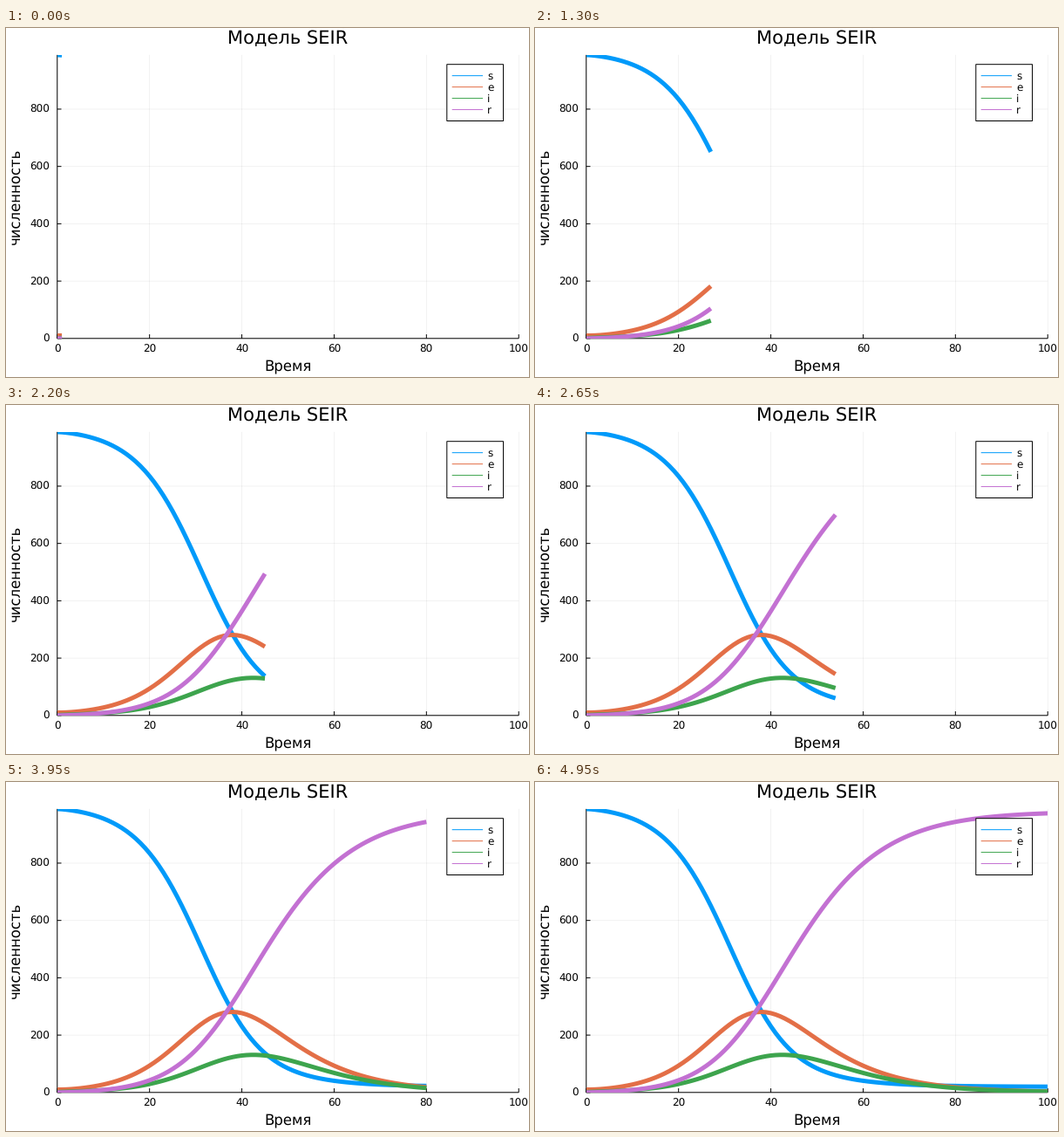
These frames come from a looping animation (600 by 400 pixels, 5 s). A matplotlib script:

```python
import numpy as np
import matplotlib.pyplot as plt
from matplotlib.animation import FuncAnimation
from matplotlib.patches import Rectangle

plt.rcParams["font.family"] = "DejaVu Sans"
plt.rcParams["text.hinting"] = "none"
plt.rcParams["path.simplify"] = False

WIDTH, HEIGHT, DPI = 600, 400, 100
PT = 72 / DPI  # points per pixel

# Plot area in pixels, y pointing down
LEFT, RIGHT, TOP, BOTTOM = 58.8, 588.2, 30.87, 355.8
T_MAX = 100

# SEIR model
BETA, DELTA, GAMMA = 0.8, 0.1, 0.2
START = np.array([989.0, 10.0, 1.0, 0.0])
POPULATION = START.sum()
Y_MAX = START[0]

NAMES = "seir"
COLORS = ["#009afa", "#e36f47", "#3da44d", "#c371d2"]


def rates(state):
    s, e, i, r = state
    infected = BETA * s * i / POPULATION
    return np.array([-infected, infected - DELTA * e,
                     DELTA * e - GAMMA * i, GAMMA * i])


def rk4(state, h):
    k1 = rates(state)
    k2 = rates(state + h / 2 * k1)
    k3 = rates(state + h / 2 * k2)
    k4 = rates(state + h * k3)
    return state + h / 6 * (k1 + 2 * k2 + 2 * k3 + k4)


def solve(substeps=5):
    states = [START]
    for _ in range(T_MAX):
        state = states[-1]
        for _ in range(substeps):
            state = rk4(state, 1 / substeps)
        states.append(state)
    return np.array(states)


def px(t):
    return LEFT + (RIGHT - LEFT) * t / T_MAX


def py(value):
    return BOTTOM - (BOTTOM - TOP) * value / Y_MAX


fig = plt.figure(figsize=(WIDTH / DPI, HEIGHT / DPI), dpi=DPI, facecolor="white")
ax = fig.add_axes([0, 0, 1, 1])
ax.set_xlim(0, WIDTH)
ax.set_ylim(HEIGHT, 0)
ax.axis("off")


def line(xs, ys, width=1.0, color="black", **kw):
    artist, = ax.plot(xs, ys, color=color, lw=width * PT, snap=False,
                      solid_capstyle="butt", solid_joinstyle="round", **kw)
    return artist


def text(x, y, label, size=12, ha="center", rotation=0):
    ax.text(x, y, label, fontsize=size * PT, ha=ha, va="baseline",
            rotation=rotation, rotation_mode="anchor", zorder=6)


def draw_axes():
    tick = 4.7
    for t in range(0, T_MAX + 1, 20):
        x = px(t)
        line([x, x], [TOP, BOTTOM], 0.5, alpha=0.1, zorder=1)
        line([x, x], [BOTTOM, BOTTOM - tick], zorder=2)
        text(x, 372.2, str(t))
    for value in range(0, 801, 200):
        y = py(value)
        line([LEFT, RIGHT], [y, y], 0.5, alpha=0.1, zorder=1)
        line([LEFT, LEFT + tick], [y, y], zorder=2)
        text(50, y + 4.3, str(value), ha="right")
    line([LEFT, RIGHT], [BOTTOM, BOTTOM], zorder=2)
    line([LEFT, LEFT], [TOP, BOTTOM], zorder=2)

    middle = (LEFT + RIGHT) / 2
    text(middle, 18.1, "Модель SEIR", 21)
    text(middle, 392, "Время", 16.5)
    text(16, (TOP + BOTTOM) / 2, "численность", 16.5, rotation=90)


def draw_legend():
    x, y, w, row = 505.8, 41.7, 64.75, 12.96
    ax.add_patch(Rectangle((x, y), w, 5 * row, facecolor="white",
                           edgecolor="black", lw=PT, snap=False, zorder=4))
    for n, (name, color) in enumerate(zip(NAMES, COLORS), 1):
        mid = y + n * row
        line([x + 5.9, x + 41.2], [mid, mid], color=color, zorder=5)
        text(x + 46.4, mid + 4.3, name, ha="left")


draw_axes()
draw_legend()

times = px(np.arange(T_MAX + 1))
paths = py(solve()).T
area = Rectangle((LEFT, TOP), RIGHT - LEFT, BOTTOM - TOP, transform=ax.transData)
curves = [line([], [], 5, color, zorder=3) for color in COLORS]
for curve in curves:
    curve.set_clip_path(area)


def update(frame):
    end = frame + 2
    for curve, path in zip(curves, paths):
        curve.set_data(times[:end], path[:end])
    return curves


anim = FuncAnimation(fig, update, frames=T_MAX, interval=50,
                     repeat=True, repeat_delay=0)
plt.show()
```
